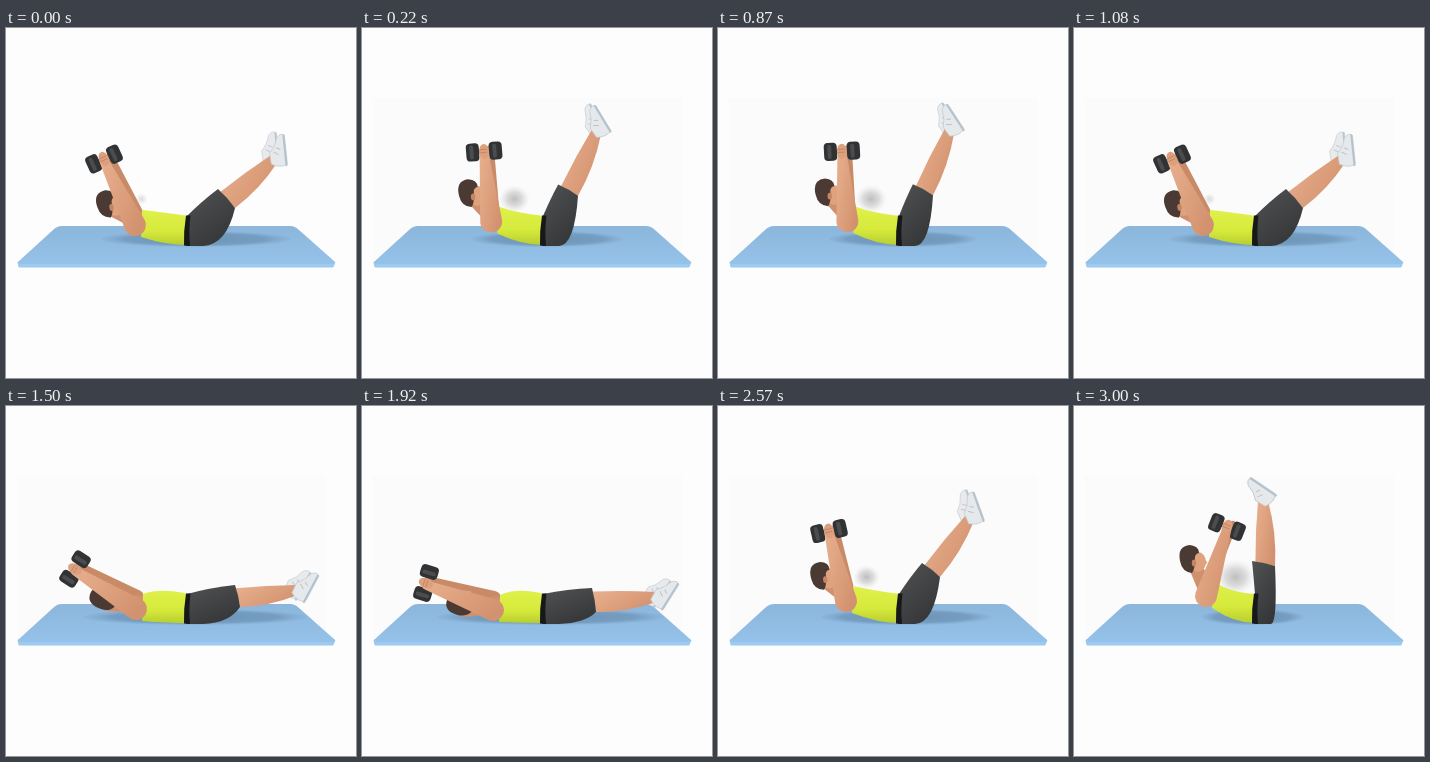
Animation of 350 by 350 pixels, one loop 3020 ms. Source, as an HTML page:

```html
<!DOCTYPE html>
<html lang="en">
<head>
<meta charset="utf-8">
<title>Dumbbell V-up</title>
<style>
html, body { margin: 0; width: 100%; height: 100%; overflow: hidden; background: #fdfdfd; }
svg { display: block; width: 100%; height: 100%; }
</style>
</head>
<body>
<svg viewBox="0 0 350 350">
  <defs>
    <linearGradient id="skin" x1="0" y1="0" x2="1" y2=".6">
      <stop offset="0" stop-color="#e9b18f"/><stop offset="1" stop-color="#d3926f"/>
    </linearGradient>
    <linearGradient id="top" x1="0" y1="0" x2="0" y2="1">
      <stop offset="0" stop-color="#e0f04a"/><stop offset=".6" stop-color="#d6ea3c"/><stop offset="1" stop-color="#b9cd30"/>
    </linearGradient>
    <linearGradient id="cloth" x1="0" y1="0" x2=".6" y2="1">
      <stop offset="0" stop-color="#505254"/><stop offset="1" stop-color="#353739"/>
    </linearGradient>
    <linearGradient id="mat" x1="0" y1="0" x2="0" y2="1">
      <stop offset="0" stop-color="#8cb6dc"/><stop offset="1" stop-color="#95c2e9"/>
    </linearGradient>
    <radialGradient id="haze">
      <stop offset="0" stop-color="#a9a9a9" stop-opacity=".75"/><stop offset=".5" stop-color="#bbb" stop-opacity=".5"/><stop offset="1" stop-color="#ddd" stop-opacity="0"/>
    </radialGradient>
    <radialGradient id="shade">
      <stop offset="0" stop-color="#6a92b4"/><stop offset=".75" stop-color="#7299bc" stop-opacity=".85"/><stop offset="1" stop-color="#7da6ca" stop-opacity=".2"/>
    </radialGradient>
    <g id="shoe">
      <path d="M-5-3L6-4Q12 2 21 4Q26 8 23 12L-6 13Q-10 6-5-3Z" fill="#e6e9ec" stroke="#c3c9ce" stroke-width=".7"/>
      <path d="M-7 12L23 11" stroke="#b4c2ce" stroke-width="2" stroke-linecap="round"/>
      <path d="M7 0L4 5M11 3L9 7" stroke="#bcc3c9" stroke-width="1"/>
    </g>
    <g id="weight">
      <rect x="-6.5" y="-9" width="13" height="18" rx="4" fill="#303234"/>
      <rect x="-3" y="-7" width="4" height="14" rx="2" fill="#4a4c4e"/>
    </g>
  </defs>
  <rect width="350" height="350" fill="#fdfdfd"/>
  <rect id="panel" x="11" y="70" width="309" height="170" fill="#fbfbfb"/>
  <path d="M12 234L13 239H327L329 234Z" fill="#9ccaf0" stroke="#9ccaf0" stroke-width="1" stroke-linejoin="round"/>
  <path d="M56 198H284Q289 198 293 202L328 233Q330 236 326 236H15Q10 236 13 233L47 202Q51 198 56 198Z" fill="url(#mat)"/>
  <ellipse id="shadow" cy="211" ry="8" fill="url(#shade)"/>
  <ellipse id="smudge" fill="url(#haze)"/>
  <path id="farArm" fill="#c98a68"/>
  <path id="neck" fill="#cf906d"/>
  <g id="head">
    <ellipse cx="8" cy="3" rx="8" ry="10" fill="#dfa27f"/>
    <path d="M14-1L17.500 4L14 6Z" fill="#dfa27f"/>
    <path d="M-10 2Q-13-13 0-14Q9-13 9-6Q4-5 5 1Q5 10 2 14Q-8 13-10 2Z" fill="#4b3a33"/>
    <ellipse cx="4" cy="4" rx="2.200" ry="3.400" fill="#c78463"/>
  </g>
  <use id="farShoe" href="#shoe" opacity=".9"/>
  <path id="leg" fill="url(#skin)"/>
  <use id="nearShoe" href="#shoe"/>
  <path id="shorts" fill="url(#cloth)"/>
  <path id="shirt" fill="url(#top)"/>
  <path d="M180 187.500L184.500 187.500Q182.500 203 184 218L178 217.500Q177.500 203 180 187.500Z" fill="#161819"/>
  <g id="bell">
    <rect x="-9" y="-2" width="18" height="4" fill="#6b6d6f"/>
    <use href="#weight" x="-11.500"/>
    <use href="#weight" x="11.500"/>
  </g>
  <path id="arm" fill="url(#skin)"/>
  <g id="hand">
    <ellipse rx="5" ry="7.500" fill="#dda07d"/>
    <path d="M-4-2H3M-4 1H3" stroke="#c08060" stroke-width=".8"/>
  </g>
</svg>
<script>
const $ = Object.fromEntries([...document.querySelectorAll('svg [id]')].map(e => [e.id, e]));
const LOOP = 3020;

// hem front, hem back, ankle, foot angle, far foot shift, bell, bell angle, head, head angle, shoulder
const POSES = [
  [230, 182, 234, 206, 294, 191, -56, -8, 64, 177, -73, 98, 199, -65, 131, 204],
  [229, 179, 234, 201, 291, 184, -60, -8, 69, 163, -58, 97, 193, -55, 130, 203],
  [212, 161, 229, 180, 268, 131, -94, -8, 98, 131, -25, 101, 176, -8, 129, 197],
  [204, 157, 222, 171, 252, 112, -108, -7, 111, 125, -13, 103, 170, -4, 128, 195],
  [178, 155, 202, 160, 194, 95, -146, 0, 148, 120, 15, 116, 154, 0, 132, 190],
  [178, 155, 201, 160, 189, 95, -144, 0, 153, 121, 22, 116, 153, 0, 132, 190]
];

// start time and place along the poses
const STEPS = [
  [0, 2], [220, 3.3], [430, 3.85], [650, 4], [870, 3.35], [1080, 2], [1290, 1.6], [1500, 1],
  [1710, .05], [1920, 0], [2140, 1.25], [2350, 1.72], [2570, 3], [2780, 3.75], [3000, 5]
];

const set = (el, attrs) => { for (const k in attrs) el.setAttribute(k, attrs[k]); };
const place = (el, x, y, a) => set(el, { transform: `translate(${x} ${y}) rotate(${a})` });

function poseAt(p) {
  const i = Math.min(Math.floor(p), POSES.length - 2), f = p - i;
  const pose = POSES[i].map((v, k) => v + (POSES[i + 1][k] - v) * f);
  if (i === 3) pose[5] -= 16 * f * (1 - f); // the foot swings on an arc
  return pose;
}

function limb(x1, y1, r1, x2, y2, r2) {
  const len = Math.hypot(x2 - x1, y2 - y1) || 1;
  const nx = -(y2 - y1) / len, ny = (x2 - x1) / len;
  const at = (x, y, r) => `${x + nx * r} ${y + ny * r}`;
  return `M${at(x1, y1, r1)}L${at(x2, y2, r2)}A${r2} ${r2} 0 0 0 ${at(x2, y2, -r2)}` +
    `L${at(x1, y1, -r1)}A${r1} ${r1} 0 0 0 ${at(x1, y1, r1)}Z`;
}

function drawLeg(ax, ay, bx, by, fx, fy) {
  const dx = fx - (ax + bx) / 2, dy = fy - (ay + by) / 2, len = Math.hypot(dx, dy);
  const nx = -dy / len, ny = dx / len;
  const sx = ax + (bx - ax) * .15, sy = ay + (by - ay) * .15;
  set($.leg, { d: `M${sx} ${sy}Q${(sx + fx) / 2 - nx * 4} ${(sy + fy) / 2 - ny * 4} ${fx - nx * 5} ${fy - ny * 5}` +
    `L${fx + nx * 5} ${fy + ny * 5}Q${(bx + fx) / 2 + nx * 8} ${(by + fy) / 2 + ny * 8} ${bx} ${by}Z` });
  set($.shorts, { d: `M181 188Q${(181 + ax) / 2} ${(188 + ay) / 2 - 2} ${ax} ${ay}` +
    `Q${(ax + bx) / 2 + 1} ${(ay + by) / 2 - 1} ${bx} ${by}Q${bx * .6 + 83} 217 197 218L180 218Z` });
}

function draw(t) {
  const p = STEPS.findLast(s => s[0] <= t)[1];
  const [ax, ay, bx, by, fx, fy, foot, far, wx, wy, wAngle, hx, hy, hAngle, sx, sy] = poseAt(p);

  drawLeg(ax, ay, bx, by, fx, fy);
  place($.nearShoe, fx, fy, foot);
  place($.farShoe, fx + far, fy + far * .3, foot);

  set($.shirt, { d: `M${sx + 7} ${sy - 15}Q155 ${181 + (204 - sy) * .4} 182 188L181 217Q160 217 ${sx + 6} ${sy + 12}Z` });
  set($.neck, { d: limb(hx + 4, hy + 6, 6, sx + 2, sy - 5, 9) });
  place($.head, hx, hy, hAngle);

  set($.farArm, { d: limb(sx + 1, sy - 12, 7, wx + 6, wy - 2, 4) });
  set($.arm, { d: limb(sx, sy, 11, wx, wy + 2, 4.5) });
  place($.bell, wx, wy, wAngle);
  place($.hand, wx, wy, wAngle);

  const left = wx * .6 + 36, right = fx * .7 + 97;
  set($.shadow, { cx: (left + right) / 2, rx: (right - left) / 2 });
  const lift = Math.max(0, Math.min(p, 4) - 1.5);
  set($.smudge, { cx: 129 + lift * 13, cy: 171, rx: 3 + lift * 7, ry: 3 + lift * 6, opacity: Math.min(1, lift) });
  set($.panel, { opacity: t < 220 ? 0 : 1 });
}

const start = performance.now();
function tick() {
  draw((performance.now() - start) % LOOP);
  requestAnimationFrame(tick);
}
tick();
</script>
</body>
</html>
```
